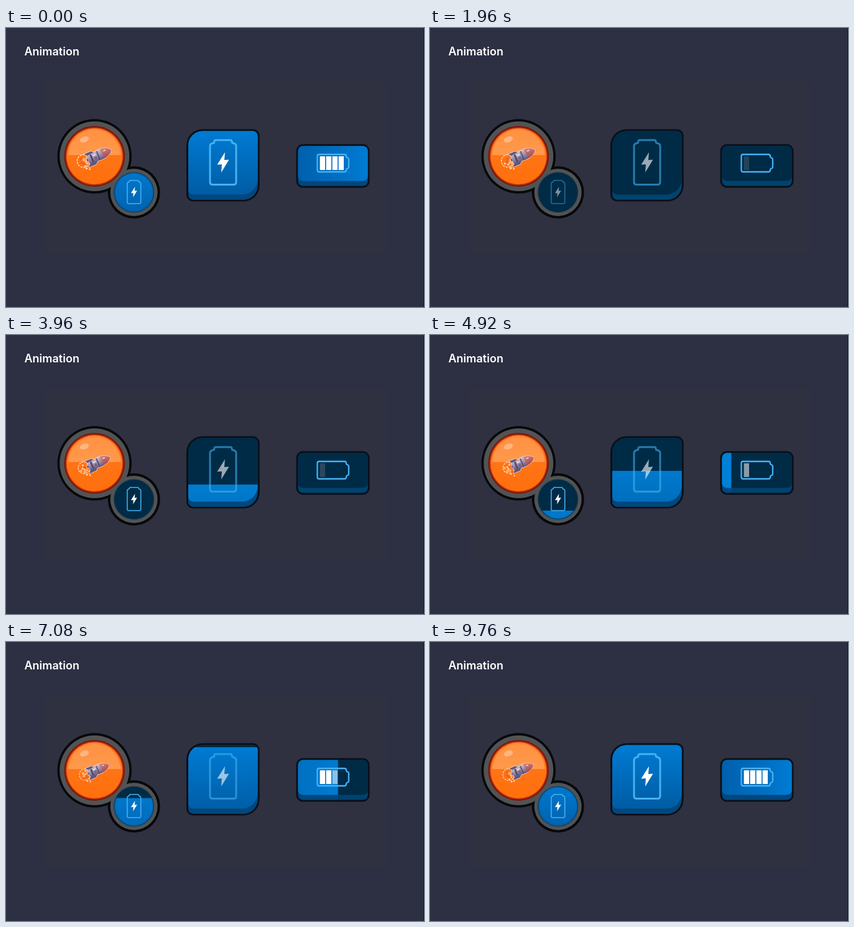
An HTML page with a canvas that plays this animation: 672x448 px, repeating every 9.8 s.

```html
<!DOCTYPE html>
<html lang="en">
<head>
<meta charset="utf-8">
<title>Animation</title>
<style>
  html, body { margin: 0; width: 100%; height: 100%; overflow: hidden; background: #2d2f42; }
  canvas { display: block; }
</style>
</head>
<body>
<canvas id="stage" width="672" height="448"></canvas>
<script>
const ctx = document.getElementById('stage').getContext('2d');
const LOOP = 9800, DRAIN = 650, CHARGE = 5000, TAU = Math.PI * 2;
const clamp = v => Math.max(0, Math.min(1, v));
const mix = (a, b, k) => a + (b - a) * k;

// Charge left in a button: full, quick drain, pause, linear refill.
const charge = (t, drainAt, chargeAt) =>
  t < chargeAt ? clamp(1 - (t - drainAt) / DRAIN) : clamp((t - chargeAt) / CHARGE);

function fill(path, color) {
  ctx.fillStyle = color;
  ctx.fill(path);
}

function disc(x, y, r, color) {
  ctx.fillStyle = color;
  ctx.beginPath();
  ctx.arc(x, y, r, 0, TAU);
  ctx.fill();
}

function oval(x, y, rx, ry, angle, color) {
  ctx.fillStyle = color;
  ctx.beginPath();
  ctx.ellipse(x, y, rx, ry, angle, 0, TAU);
  ctx.fill();
}

function rounded(x, y, right, bottom, radii) {
  const p = new Path2D();
  p.roundRect(x, y, right - x, bottom - y, radii);
  return p;
}

function gradient(x0, y0, x1, y1, ...colors) {
  const g = ctx.createLinearGradient(x0, y0, x1, y1);
  colors.forEach((c, i) => g.addColorStop(i / (colors.length - 1), c));
  return g;
}

function clipped(path, draw) {
  ctx.save();
  ctx.clip(path);
  draw();
  ctx.restore();
}

function area(x, y, right, bottom) {
  const p = new Path2D();
  p.rect(x, y, right - x, bottom - y);
  return p;
}

const tallBattery = new Path2D('M-12-36H12Q14-36 14-34Q14-31 17-31Q21-30 21-26V31Q21 35.500 17 35.500H-17Q-21 35.500-21 31V-26Q-21-30-17-31Q-14-31-14-34Q-14-36-12-36Z');
const bolt = new Path2D('M3-16.500L-9.500 3.500L-2 3L-3 16L9.500-4.500L2-4Z');
const wideBattery = new Path2D('M503 203H544Q547 203 547 206Q547 208 549 208.500Q551 209 551 211V223Q551 225 549 225.500Q547 226 547 228Q547 231 544 231H503Q500.500 231 500.500 228V206Q500.500 203 503 203Z');

const square = {
  rim: rounded(290, 162.5, 407.7, 278.5, [26, 11, 26, 11]),
  base: rounded(293, 165.5, 404.7, 275.7, [23, 8, 23, 8]),
  face: rounded(293, 165.5, 404.7, 267.5, [23, 8, 25, 8]),
  shade: gradient(0, 165, 0, 267, '#007bd3', '#005ca4')
};
const bar = {
  rim: rounded(466.5, 186.5, 584.5, 256.5, 11),
  base: rounded(469.5, 189.5, 581.7, 253.5, 8),
  face: rounded(469.5, 189.5, 581.7, 245.5, 8),
  shade: gradient(469, 0, 582, 0, '#0060ac', '#006dc0', '#007bd2')
};

function drawButton(button, level, lit) {
  fill(button.rim, '#0a0f18');
  fill(button.base, '#00436f');
  fill(button.face, '#002b46');
  clipped(lit, () => {
    fill(button.base, '#00477d');
    fill(button.face, button.shade);
    fill(button.face, `rgba(0,150,240,${0.7 * (1 - level)})`);
  });
}

function drawTallBattery(x, y, scale, alpha) {
  ctx.save();
  ctx.translate(x, y);
  ctx.scale(scale, scale);
  ctx.globalAlpha = alpha;
  ctx.strokeStyle = '#45b2f2';
  ctx.lineWidth = 3;
  ctx.stroke(tallBattery);
  fill(bolt, '#fff');
  ctx.restore();
}

function drawWideBattery(t, level) {
  ctx.strokeStyle = '#45b2f2';
  ctx.lineWidth = 2.3;
  ctx.stroke(wideBattery);
  const pulse = 0.4 + 0.17 * Math.cos(t / 1200 * TAU);
  const refilling = t > 930 + DRAIN;
  for (let i = 0; i < 4; i++) {
    const part = clamp(level * 4 - i);
    const active = Math.floor(level * 4) === i;
    const alpha = !refilling ? Math.max(part, i ? 0.15 : 0.2) : part === 1 ? 1 : active ? pulse : 0;
    // An empty battery keeps only a faint first cell.
    ctx.fillStyle = level === 0 ? `rgba(125,125,140,${alpha})` : `rgba(255,255,255,${alpha})`;
    ctx.fillRect(504.6 + i * 10, 206, 8.4, 22);
  }
}

const rocketHull = new Path2D('M-15-6L5-8Q17-8 23 0Q17 8 5 8L-15 6Z');
const rocketNose = new Path2D('M7-7.500Q17-8 23 0Q17 8 7 7.500Q10 0 7-7.500Z');
const rocketFins = new Path2D('M-13-5L-17-10L-6-10L-2-6ZM-13 5L-18 11L-6 11L-1 6ZM-17-2H-6V2H-17Z');

// The rocket stretches gently around the middle of its orb.
function drawRocket(t) {
  const stretch = 1 + 0.07 * Math.cos(t / 16000 * TAU);
  const flicker = Math.sin(t / 90);
  ctx.save();
  ctx.translate(141.7, 207.5);
  ctx.scale(stretch, stretch);
  ctx.rotate(-0.4);
  ctx.translate(5, 0);

  // Exhaust puffs inside a broken pale outline
  ctx.strokeStyle = '#ffe3c8';
  ctx.lineWidth = 1.3;
  ctx.setLineDash([3, 1.5]);
  ctx.lineDashOffset = t / 60;
  ctx.beginPath();
  ctx.arc(-22, -1, 9.5 + flicker * 0.5, 0.7, 5.6);
  ctx.stroke();
  ctx.setLineDash([]);
  for (let i = 0; i < 9; i++) {
    const a = i * 2.4 + t / 1500, r = 2 + i * 0.75;
    disc(-21 + r * Math.cos(a), 1 + r * Math.sin(a), 1.5 + i % 3 * 0.4,
      ['#ffd2ac', '#e9622c', '#ffb06f'][i % 3]);
  }
  disc(-22, 11 + flicker, 1.5, '#ffd7b5');
  disc(-18, 14 - flicker, 1.2, '#ffe3c8');

  ctx.lineWidth = 1.6;
  ctx.lineJoin = 'round';
  ctx.strokeStyle = '#f0d4cc';
  ctx.stroke(rocketHull);
  ctx.stroke(rocketFins);
  fill(rocketFins, '#62577a');
  fill(rocketHull, gradient(0, -8, 0, 8, '#cdbfcf', '#9a8ba8', '#63557a'));
  fill(rocketNose, gradient(0, -8, 0, 8, '#d98078', '#a24a52'));
  ctx.fillStyle = '#4e4564';
  ctx.fillRect(-10, -6, 2.5, 12);
  ctx.fillRect(1, -7, 1.5, 14);
  ctx.fillStyle = '#eee2e8';
  ctx.fillRect(-6, -4, 5, 2);
  ctx.fillRect(11, -4, 4, 1.5);
  disc(-3, 2, 2, '#6d6587');
  ctx.restore();
}

function drawOrbs(t) {
  const big = [142.3, 206], small = [205.7, 264];
  disc(...big, 59.7, '#07080b');
  disc(...small, 42, '#07080b');
  disc(...big, 56, '#525354');
  disc(...small, 38, '#525354');

  disc(...big, 48.7, '#7b150d');
  disc(...big, 46.7, '#b92f0b');
  disc(...big, 45, gradient(0, 160, 0, 252, '#ff842c', '#ff7415', '#ff6f0c'));
  clipped(area(90, 150, 195, 204), () =>
    disc(...big, 42.5, gradient(0, 163, 0, 204, 'rgba(255,175,115,.35)', 'rgba(255,190,130,.5)')));
  oval(126, 179, 7.5, 4.5, -0.35, 'rgba(255,205,170,.6)');
  drawRocket(t);

  const start = 1300, refill = 3550, level = charge(t, start, refill);
  disc(...small, 32.5, '#123249');
  disc(...small, 31, '#002b46');
  clipped(area(170, mix(302, 229.5, level), 240, 300), () => {
    disc(...small, 32, '#00518e');
    disc(...small, 30.5, gradient(0, 232, 0, 296, '#0078ce', '#0062ae'));
    disc(...small, 30.5, `rgba(0,150,240,${0.5 * (1 - level)})`);
  });
  const press = clamp((t - 900) / 150) * clamp((1450 - t) / 150);
  const empty = t > start + DRAIN && t < refill;
  drawTallBattery(205.8, 263.5, 0.52 * (1 - 0.07 * press), empty ? 0.5 : 1);
}

function draw(t) {
  ctx.fillStyle = '#2d2f42';
  ctx.fillRect(0, 0, 672, 448);
  ctx.fillStyle = '#2f3140';
  ctx.fillRect(61, 86, 550, 275);
  ctx.fillStyle = '#14151e';
  ctx.fillRect(671, 0, 1, 448);

  ctx.fillStyle = '#fff';
  ctx.font = '600 18px Inter, sans-serif';
  ctx.fillText('Animation', 29.5, 43.5);

  drawOrbs(t);

  const squareLevel = charge(t, 900, 2300);
  drawButton(square, squareLevel, area(290, mix(278, 164, squareLevel), 408, 279));
  drawTallBattery(349, 216, 1, t > 900 + DRAIN && squareLevel < 1 ? 0.6 : 1);

  const barLevel = charge(t, 930, 4250);
  drawButton(bar, barLevel, area(466, 186, mix(469, 583, barLevel), 257));
  drawWideBattery(t, barLevel);
}

function frame() {
  draw(performance.now() % LOOP);
  requestAnimationFrame(frame);
}
frame();
</script>
</body>
</html>
```
